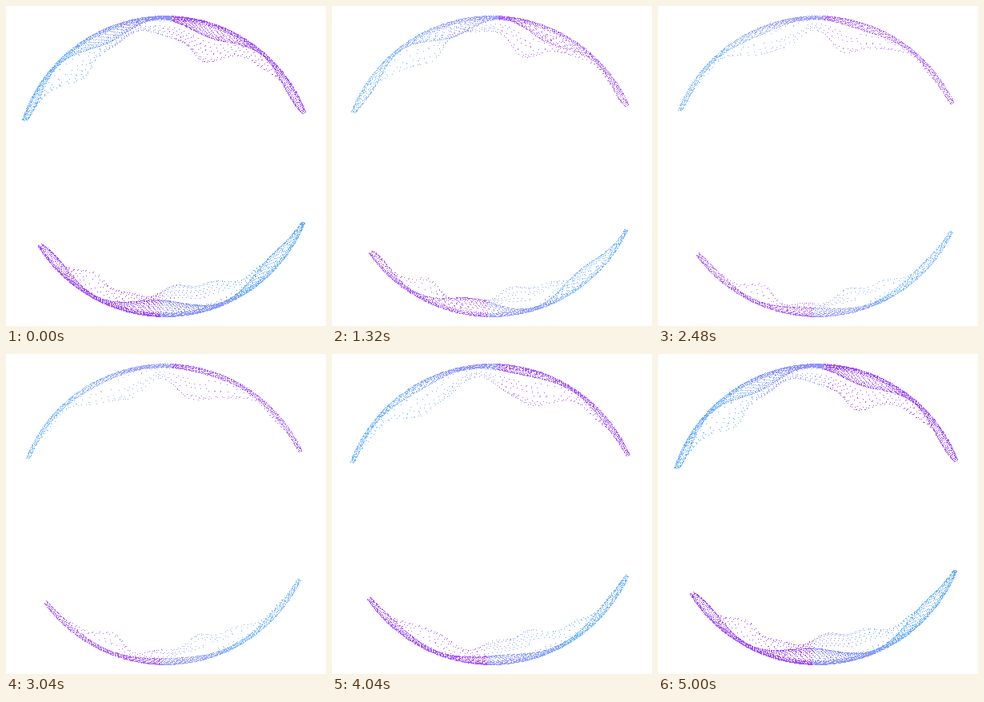
Write an HTML page with a canvas that moves like this. It is 400x400 px and loops after 5.04 s.

```html
<!DOCTYPE html>
<html lang="en">
<head>
<meta charset="utf-8">
<title>Particle ring</title>
<style>
  html, body { margin: 0; width: 100%; height: 100%; overflow: hidden; background: #fff; }
  canvas { display: block; width: 400px; height: 400px; }
</style>
</head>
<body>
<canvas id="stage" width="400" height="400"></canvas>
<script>
const ctx = document.getElementById('stage').getContext('2d');
const LOOP = 5040, STEP = 40, COUNT = 7600;
const CX = 199, CY = 200, RADIUS = 188, TAU = 2 * Math.PI;
const [BLUE, INDIGO, PURPLE] = ['#6cb0fc', '#8f93fc', '#a04ffa'];

// Angles are in degrees; every other position runs from 0 to 1 along the arc.
const ARCS = [
  { from: 198, to: 339, indigoAt: .31, purpleAt: .53, foldAt: .17, foldSpan: .32, foldDepth: 10,
    bumps: [{ at: .28, sway: -.08, height: 28, width: .11 }, { at: .64, sway: .01, height: 32, width: .1 }] },
  { from: 22, to: 148, indigoAt: .38, purpleAt: .555, foldAt: .35, foldSpan: .42, foldDepth: 12,
    bumps: [{ at: .42, sway: .04, height: 20, width: .16 }, { at: .78, sway: .02, height: 18, width: .08 }] }
];

const mix = (a, b, k) => a + (b - a) * k;
// Evenly scattered value: fractional part of multiples of an irrational number.
const scatter = (i, ratio) => i * ratio % 1;

function makeDot(_, i) {
  const arc = ARCS[i % 2], s = scatter(i, .7548776662), layer = scatter(i, .4142135624);
  const u = s + .3 * Math.sin(TAU * s) / TAU;   // denser in the middle of the arc
  const blend = u + (scatter(i, .2360679775) - .5) * .2;
  return {
    arc, u, v: scatter(i, .5698402910), rank: scatter(i, .6457513111),
    layer: layer < .42 ? 'rim' : layer < .88 ? 'fold' : 'veil',
    color: u > arc.purpleAt ? PURPLE : blend > arc.indigoAt ? INDIGO : BLUE
  };
}
const dots = Array.from({ length: COUNT }, makeDot)
  .sort((a, b) => a.color.localeCompare(b.color));

// Distance inward from the circle.
function depthOf({ arc, u, v, layer }, phase) {
  const taper = Math.sqrt(Math.sin(Math.PI * u));
  const rim = (2 + 3 * taper) * v * v;
  if (layer === 'rim') return rim;

  const swell = arc.foldDepth + 8 * Math.cos(phase - .9);
  const shift = arc.foldAt + .05 * Math.sin(phase);
  const fold = 4 + taper * swell * Math.sin(Math.PI * (u - shift) / arc.foldSpan) ** 2;
  if (layer === 'fold') return fold * Math.sin(v * Math.PI / 2);

  let edge = 14 + 4 * Math.cos(phase) + 3 * Math.sin(40 * u + phase);
  for (const { at, sway, height, width } of arc.bumps) {
    const x = (u - at - sway * Math.cos(phase - .3)) / width;
    edge += height * Math.exp(-x * x);
  }
  return mix(Math.max(fold, edge * taper), fold, v * v);
}

function draw(time) {
  const phase = time / LOOP * TAU;
  const glow = ((1 + Math.cos(phase)) / 2) ** 2;
  const density = mix(.55, 1, glow), inset = mix(4, 0, glow);

  ctx.clearRect(0, 0, 400, 400);
  ctx.globalAlpha = mix(.8, 1, glow);
  for (const dot of dots) {
    if (dot.rank > density) continue;
    const angle = mix(dot.arc.from + inset, dot.arc.to - inset, dot.u) * TAU / 360;
    const r = RADIUS - depthOf(dot, phase);
    ctx.fillStyle = dot.color;
    ctx.fillRect(Math.round(CX + r * Math.cos(angle)), Math.round(CY + r * Math.sin(angle)), 1, 1);
  }
}

function tick() {
  draw(Math.floor(performance.now() / STEP) * STEP % LOOP);
  requestAnimationFrame(tick);
}
tick();
</script>
</body>
</html>
```
